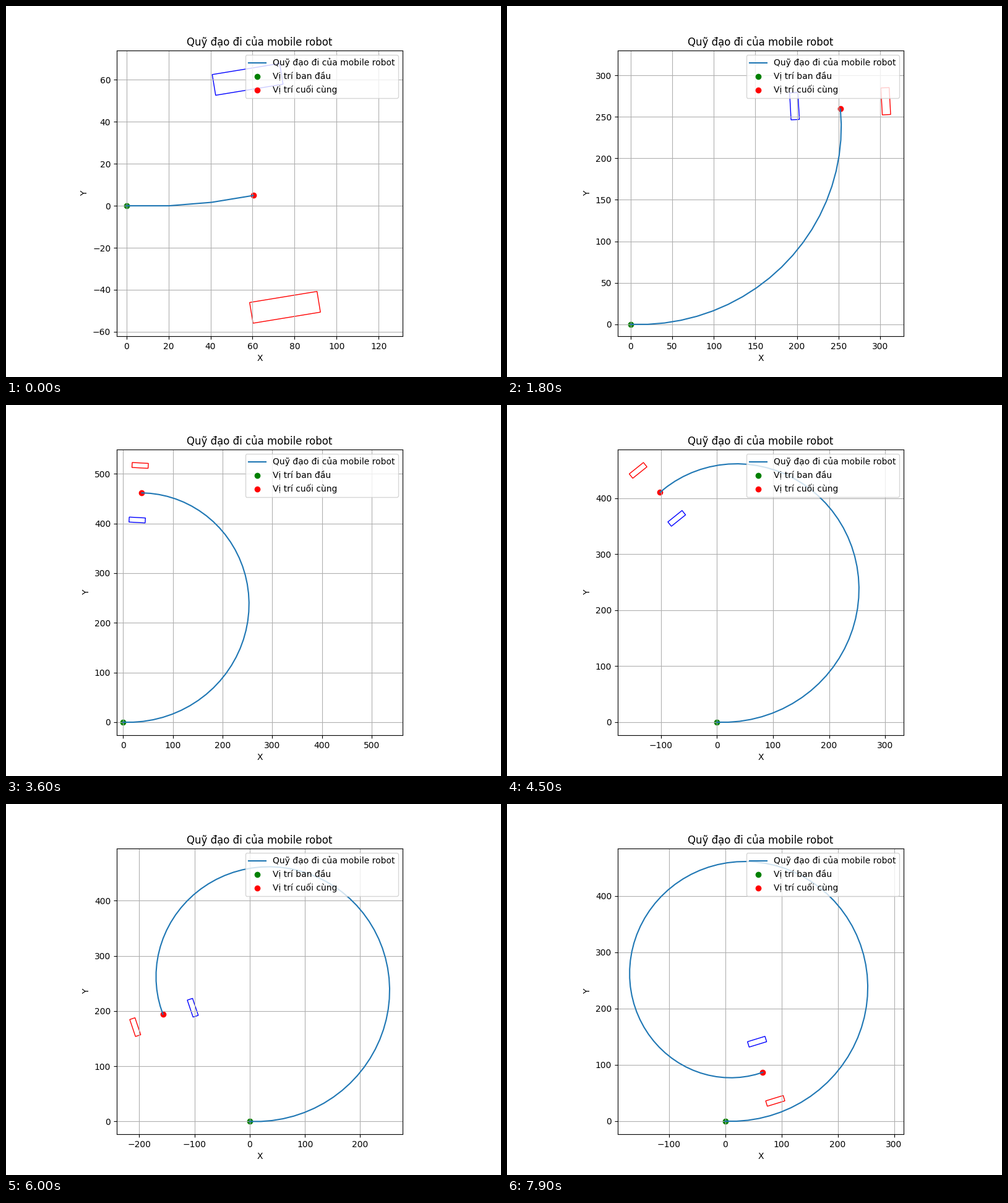
A matplotlib script that plays this animation: 800 by 600 pixels, repeating every 8 s.

```python
import numpy as np
import matplotlib.pyplot as plt
from matplotlib.animation import FuncAnimation
from matplotlib.patches import Polygon

FRAMES = 80
START = 3            # steps already driven when the loop begins
SPEED, SLOWDOWN = 20.325, 0.0813
TURN = 0.08125       # heading change per step, radians
HALF_TRACK = 55
WHEEL_BACK, WHEEL_FRONT, WHEEL_HALF = -10, 22.5, 5
MARGIN = 0.05

# Unicycle model: turn rate is constant, speed falls linearly.
k = np.arange(START + FRAMES)
heading = k * TURN
speed = SPEED - SLOWDOWN * k
steps = np.column_stack([speed * np.cos(heading), speed * np.sin(heading)])
path = np.vstack([[0, 0], np.cumsum(steps, axis=0)])


def wheel(pos, angle, side):
    """Corners of a wheel left (+1) or right (-1) of the robot."""
    lo, hi = side * HALF_TRACK - WHEEL_HALF, side * HALF_TRACK + WHEEL_HALF
    local = np.array([[WHEEL_BACK, lo], [WHEEL_FRONT, lo],
                      [WHEEL_FRONT, hi], [WHEEL_BACK, hi]])
    c, s = np.cos(angle), np.sin(angle)
    return pos + local @ np.array([[c, s], [-s, c]])


plt.rcParams["font.family"] = "DejaVu Sans"
fig, ax = plt.subplots(figsize=(8, 6), dpi=100)
ax.set_aspect("equal", adjustable="box", anchor="C")
line, = ax.plot([], [], label="Quỹ đạo đi của mobile robot")
ax.scatter([0], [0], color="green", label="Vị trí ban đầu")
end = ax.scatter([0], [0], color="red", label="Vị trí cuối cùng")
right, left = (ax.add_patch(Polygon(wheel(path[0], 0, side), closed=True,
                                    fill=False, edgecolor=color, linewidth=1))
               for side, color in ((-1, "r"), (1, "b")))
ax.set(title="Quỹ đạo đi của mobile robot", xlabel="X", ylabel="Y")
ax.grid(True)
ax.legend(loc="upper right")


def fit_square(points):
    """Square view that starts at the padded lower-left corner of the data."""
    low, high = points.min(axis=0), points.max(axis=0)
    span = high - low
    x0, y0 = low - MARGIN * span
    edge = span.max() * (1 + 2 * MARGIN)
    ax.set_xlim(x0, x0 + edge)
    ax.set_ylim(y0, y0 + edge)


def update(i):
    n = START + i
    trail, pos, angle = path[:n + 1], path[n], heading[n - 1]
    corners = [wheel(pos, angle, side) for side in (-1, 1)]
    line.set_data(trail[:, 0], trail[:, 1])
    end.set_offsets([pos])
    right.set_xy(corners[0])
    left.set_xy(corners[1])
    fit_square(np.vstack([trail, *corners]))
    return line, end, right, left


anim = FuncAnimation(fig, update, frames=FRAMES, interval=100,
                     init_func=lambda: update(0), repeat=True, repeat_delay=0)
plt.show()
```
